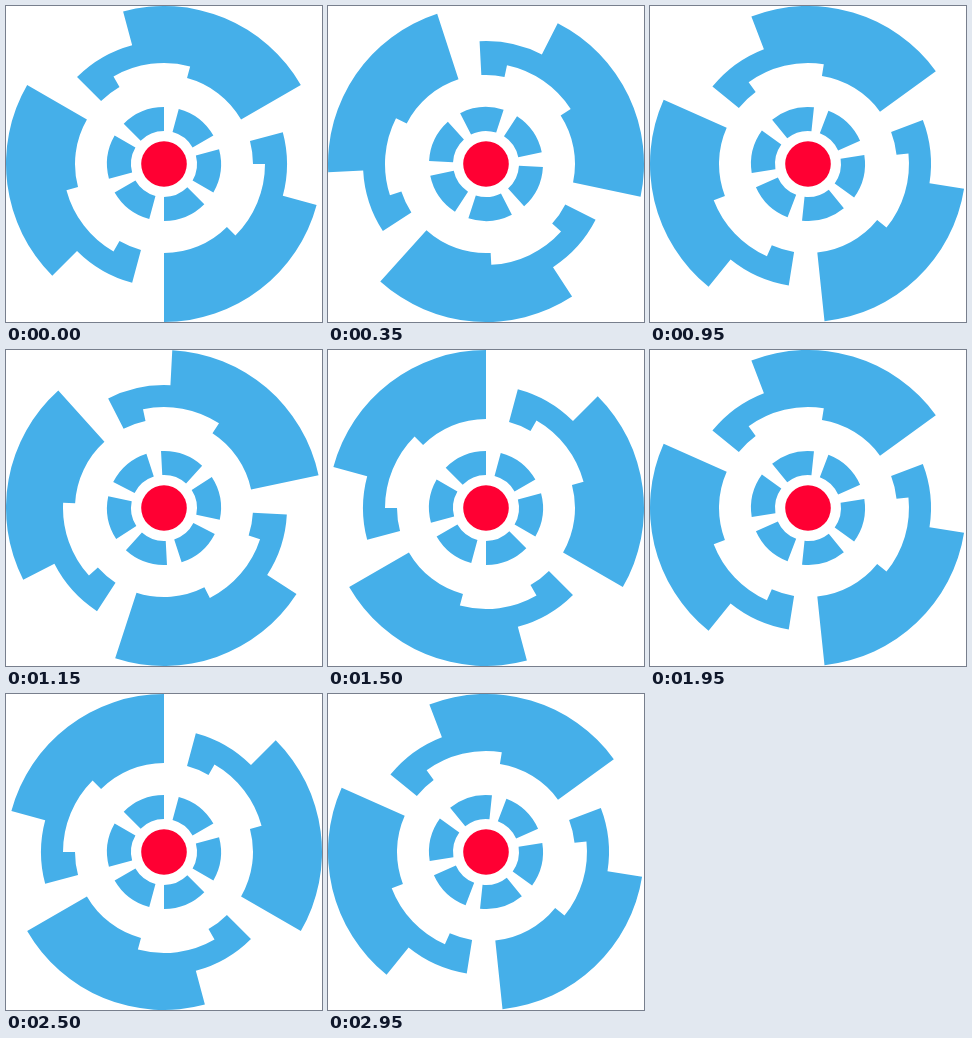
An HTML page with a canvas that plays this animation: 316 by 316 pixels, repeating every 3 s.

```html
<!DOCTYPE html>
<html>
<head>
<meta charset="utf-8">
<style>
html, body { margin: 0; width: 100%; height: 100%; overflow: hidden; background: #fff; }
canvas { display: block; }
</style>
</head>
<body>
<canvas id="stage" width="316" height="316"></canvas>
<script>
const ctx = document.getElementById('stage').getContext('2d');
const BLUE = '#45afe9', RED = '#ff0033';
const STEP_MS = 50, STEP_DEG = 6, LOOP_MS = 3000;

// Arcs as [radius, from, to], in degrees clockwise from twelve o'clock
const BLADE = [
  [123, 75, 105], [158, 105, 180],
  [89, 180, 135], [101, 135, 90], [89, 90, 75]
];
const SEGMENT = [[57, -45, 0], [33, 0, -45]];

const rad = deg => (deg - 90) * Math.PI / 180;

function fillArcs(arcs, turn) {
  ctx.beginPath();
  for (const [r, from, to] of arcs)
    ctx.arc(158, 158, r, rad(from + turn), rad(to + turn), to < from);
  ctx.fill();
}

function ring(arcs, count, turn) {
  for (let i = 0; i < count; i++) fillArcs(arcs, turn + i * 360 / count);
}

function draw() {
  const turn = Math.floor(performance.now() % LOOP_MS / STEP_MS) * STEP_DEG;
  ctx.clearRect(0, 0, 316, 316);
  ctx.fillStyle = BLUE;
  ring(BLADE, 3, turn);
  ring(SEGMENT, 6, -turn);
  ctx.fillStyle = RED;
  fillArcs([[22.8, 0, 360]], 0);
  requestAnimationFrame(draw);
}
draw();
</script>
</body>
</html>
```
